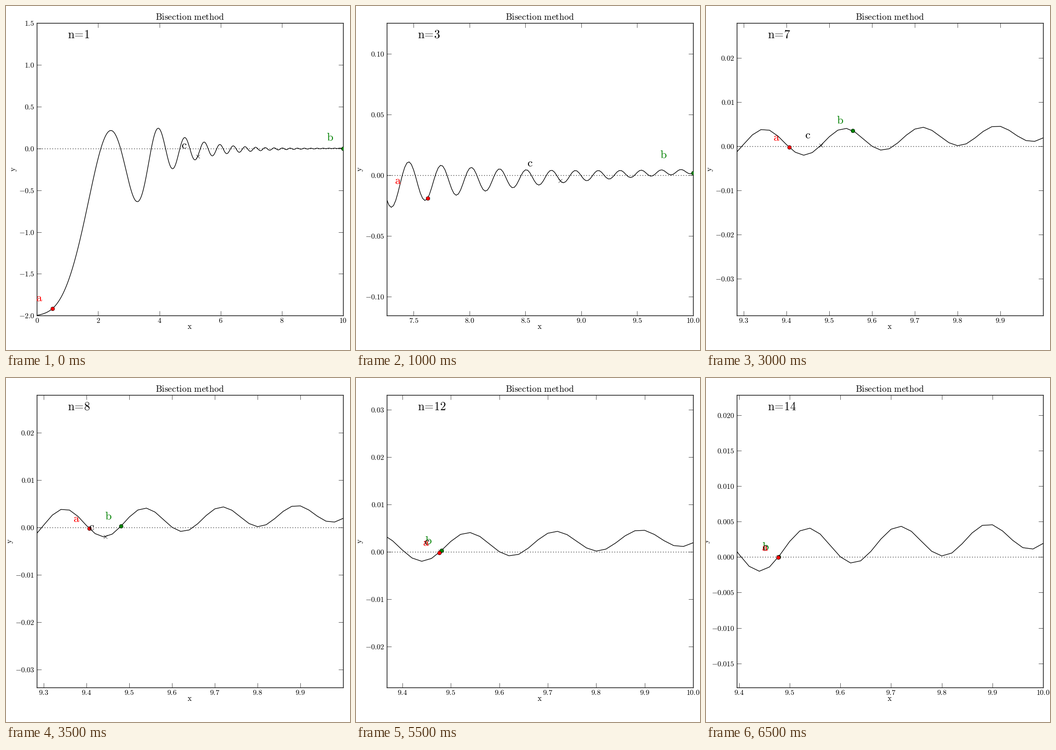
Animation, 748 px wide and 748 px high, one loop 7000 ms. Source, as a matplotlib script:

```python
import math

import matplotlib.pyplot as plt
import numpy as np
from matplotlib.animation import FuncAnimation

SIZE = 748
STEPS = 14
RIGHT = 10.0
plt.rcParams["mathtext.fontset"] = "cm"

# Camera key steps: width of the view, and its reach above and below zero
KEYS = [1, 3, 5, 8, 10, 12, 13, 14]
WIDTH = [10, 2.7385, 0.7161, 0.7161, 0.6876, 0.6318, 0.6318, 0.6041]
ABOVE = [1.5, 0.1252, 0.0279, 0.0279, 0.0279, 0.0331, 0.0176, 0.0228]
BELOW = [2, 0.1158, 0.0493, 0.0338, 0.0235, 0.0287, 0.0184, 0.0184]


def zoom(n, values):
    """Geometric easing between the key steps."""
    return float(np.exp(np.interp(n, KEYS, np.log(values))))


def bump(n, centre, spread, power):
    return math.exp(-abs((n - centre) / spread) ** power)


def f(x):
    wave = 4 * x * np.exp(-x) * np.sin(x**3 / 8)
    return np.tanh(x - 2) - 1.03347 + 0.00365 * x + wave


def bisect(a, b, count):
    """Return (a, b, c) for every step."""
    rows = []
    for _ in range(count):
        c = (a + b) / 2
        rows.append((a, b, c))
        if f(c) < 0:
            a = c
        else:
            b = c
    return rows


def ticks(lo, hi):
    """Round tick places with at most nine gaps, their labels and decimals."""
    raw = (hi - lo) / 9
    unit = 10.0 ** math.floor(math.log10(raw))
    step = next(m * unit for m in (1, 2, 5, 10) if m * unit >= raw)
    digits = max(0, -math.floor(math.log10(step) + 1e-9))
    base = lo // step * step
    places = [base + k * step for k in range(11)]
    places = [p for p in places if lo <= p <= hi]
    names = [f"${round(p, digits) + 0.0:.{digits}f}$" for p in places]
    return places, names, digits


def rm(text):
    text = text.replace(" ", r"\ ").replace("=", r"\!=\!")
    return r"$\mathrm{" + text + "}$"


def fig_text(x, y, text, size, **kw):
    return fig.text(x / SIZE, 1 - y / SIZE, rm(text), fontsize=size, **kw)


fig = plt.figure(figsize=(SIZE / 100, SIZE / 100), dpi=100, facecolor="white")
ax = fig.add_axes([0.09, 0.1, 0.89, 0.85])
for side in ax.spines.values():
    side.set_linewidth(1)
ax.tick_params(direction="in", length=7.2, width=0.5, top=True, right=True,
               labelsize=11.5)
ax.tick_params(axis="x", pad=3)
ax.tick_params(axis="y", pad=4)

fig_text(399.5, 29.5, "Bisection method", 14.1, ha="center")
fig_text(399.5, 702, "x", 12, ha="center")
y_name = fig_text(17, 355, "y", 12, ha="center", va="center", rotation=90)
counter = fig_text(133.5, 70, "n=1", 18.4)

xs = np.linspace(0, RIGHT, 501)
ax.plot(xs, f(xs), color="black", lw=1)
ax.axhline(0, color="black", lw=1, ls=(0, (1, 3)), dash_capstyle="butt")


def marker(shape, color, edge, zorder):
    return ax.plot([], [], shape, color=color, mec=edge, ms=6, mew=0.5,
                   zorder=zorder)[0]


def tag(name, color, zorder):
    return ax.annotate(rm(name), (0, 0), xytext=(0, 0),
                       textcoords="offset pixels", color=color, fontsize=18,
                       zorder=zorder, annotation_clip=False)


marks = [marker("o", "red", "black", 5), marker("o", "green", "black", 4),
         marker("x", "black", "black", 3)]
tags = [tag("a", "red", 8), tag("b", "green", 6), tag("c", "black", 7)]
rows = bisect(0.5, RIGHT, STEPS)


def draw(i):
    n = i + 1
    x0 = RIGHT - zoom(n, WIDTH)
    y0, y1 = -zoom(n, BELOW), zoom(n, ABOVE)
    places, names, _ = ticks(x0, RIGHT)
    ax.set_xticks(places, names)
    places, names, digits = ticks(y0, y1)
    ax.set_yticks(places, names)
    ax.set_xlim(x0, RIGHT)
    ax.set_ylim(y0, y1)
    y_name.set_x((24.5 - 7.5 * max(digits, 1)) / SIZE)
    counter.set_text(rm(f"n={n}"))

    left = 35.5 + 38.5 * bump(n, 3.9, 1.9, 4)
    up = 14.5 + 18 * bump(n, 3.4, 1.6, 2)
    for x, mark, label in zip(rows[i], marks, tags):
        mark.set_data([x], [f(x)])
        label.xy = (x, f(x))
        label.set_position((-left, up))
    return []


anim = FuncAnimation(fig, draw, frames=STEPS, interval=500, repeat=True,
                     repeat_delay=0, blit=False)
plt.show()
```
